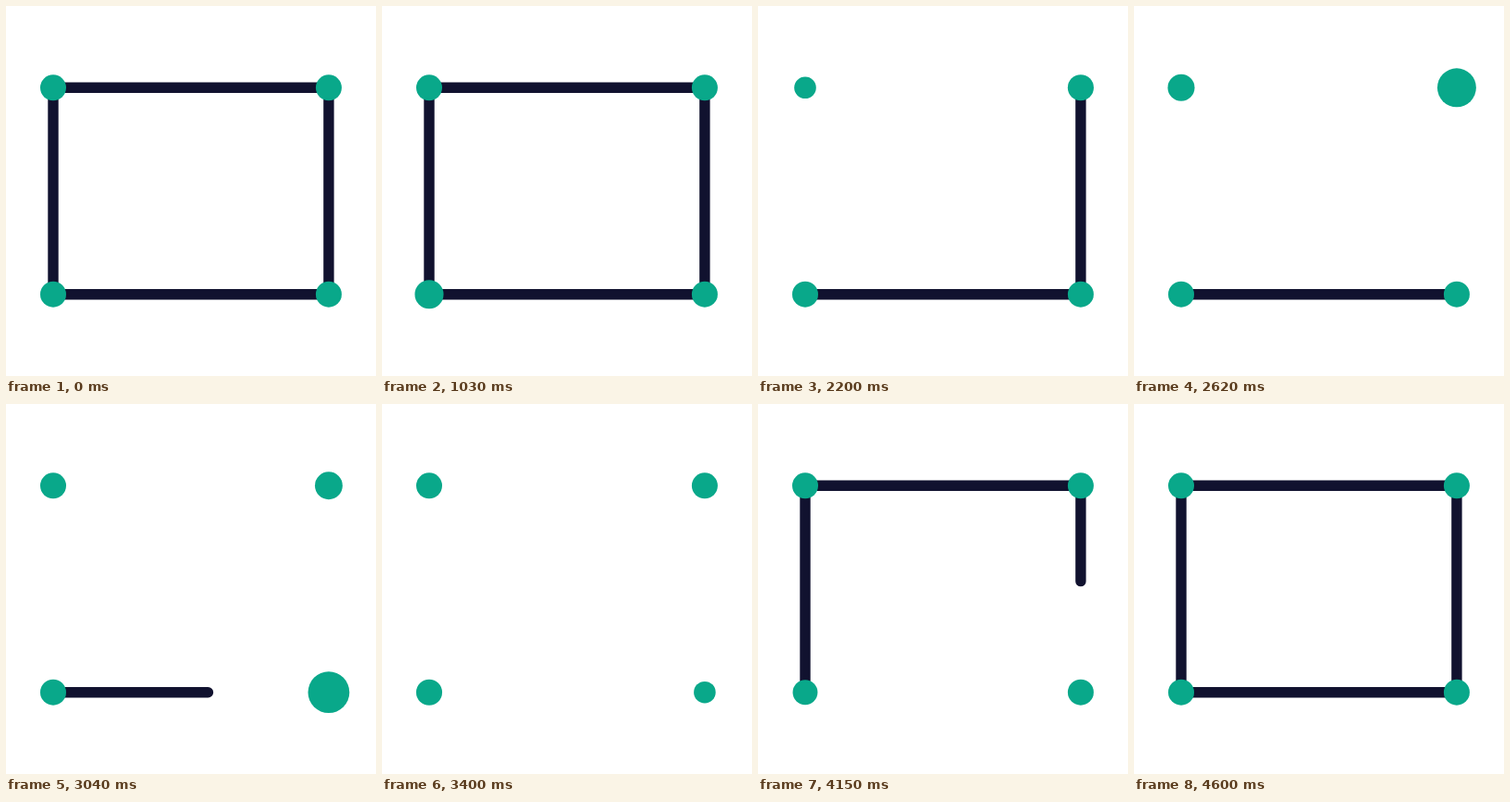
Animation of 400 by 400 pixels, one loop 4630 ms. Source, as an HTML page:

```html
<!DOCTYPE html>
<html lang="en">
<head>
<meta charset="utf-8">
<title>Rectangle path</title>
<style>
html, body { margin: 0; width: 100%; height: 100%; overflow: hidden; background: #fff; }
svg { display: block; width: 100vw; height: 100vh; }
</style>
</head>
<body>
<svg viewBox="0 0 400 400">
  <g id="edges" stroke="#11122f" stroke-width="11.4" stroke-linecap="round"></g>
  <g id="dots" fill="#09a88a"></g>
</svg>
<script>
const LOOP = 4630, FIRST = 1000, STEP = 600;
const ERASE_DELAY = 100, ERASE_TIME = 322;
const DRAW_FROM = 3480, DRAW_TO = 4600;
const RADIUS = 14;
const corners = [[51, 311.7], [51, 88.3], [348.9, 88.3], [348.9, 311.7]];
// dot pulse: [ms since its start, scale]
const pulse = [[0, 1], [168, 1.6], [393, 1.6], [613, 0.8], [870, 1.1], [1115, 1]];

const clamp = v => Math.max(0, Math.min(1, v));
const mix = (a, b, k) => a + (b - a) * k;

function add(id, tag) {
  const el = document.createElementNS('http://www.w3.org/2000/svg', tag);
  return document.getElementById(id).appendChild(el);
}
function set(el, attrs) {
  for (const name in attrs) el.setAttribute(name, attrs[name]);
}

let total = 0;
const edges = corners.map((p, i) => {
  const q = corners[(i + 1) % 4];
  const edge = { p, q, from: total, length: Math.hypot(q[0] - p[0], q[1] - p[1]), el: add('edges', 'line') };
  total += edge.length;
  return edge;
});
const dots = corners.map(([cx, cy]) => {
  const el = add('dots', 'circle');
  set(el, { cx, cy });
  return el;
});

function scaleAt(t) {
  if (t <= 0) return 1;
  for (let i = 1; i < pulse.length; i++) {
    const [t0, s0] = pulse[i - 1], [t1, s1] = pulse[i];
    if (t < t1) return mix(s0, s1, (t - t0) / (t1 - t0));
  }
  return 1;
}

function showEdge({ p, q, el }, a, b) {
  set(el, {
    x1: mix(p[0], q[0], a), y1: mix(p[1], q[1], a),
    x2: mix(p[0], q[0], b), y2: mix(p[1], q[1], b),
    visibility: b > a ? 'visible' : 'hidden'
  });
}

function render(t) {
  const drawn = total * clamp((t - DRAW_FROM) / (DRAW_TO - DRAW_FROM));
  edges.forEach((edge, i) => {
    if (t < DRAW_FROM) {
      showEdge(edge, clamp((t - FIRST - i * STEP - ERASE_DELAY) / ERASE_TIME), 1);
    } else {
      showEdge(edge, 0, clamp((drawn - edge.from) / edge.length));
    }
  });
  dots.forEach((dot, i) => {
    let since = t - FIRST - i * STEP;
    // the first corner pulses again when the path closes
    if (i === 0 && since >= 4 * STEP) since -= 4 * STEP;
    dot.setAttribute('r', RADIUS * scaleAt(since));
  });
}

const start = performance.now();
function tick() {
  render((performance.now() - start) % LOOP);
  requestAnimationFrame(tick);
}
render(0);
requestAnimationFrame(tick);
</script>
</body>
</html>
```
